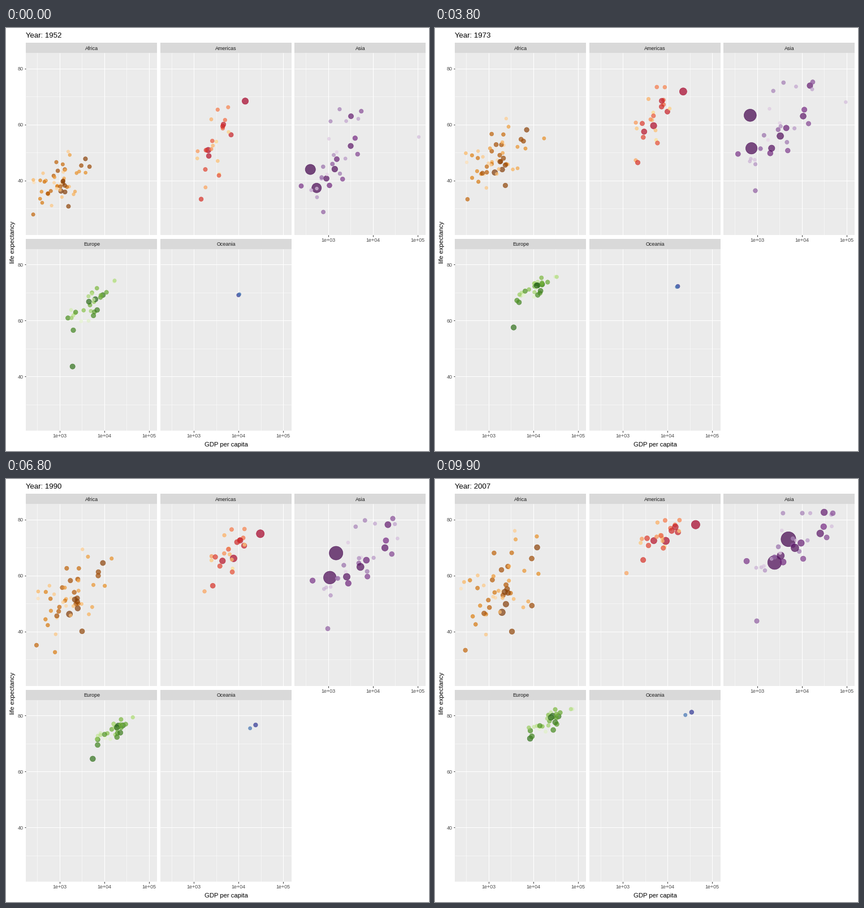
Write a matplotlib script that moves like this. It is 748x748 px and loops after 10 s.

```python
import numpy as np
import matplotlib.pyplot as plt
from matplotlib.animation import FuncAnimation
from matplotlib.colors import to_rgb
from matplotlib.patches import Rectangle

SIZE, DPI, FRAMES = 748, 88, 100
PT = 72 / DPI                      # points per pixel
X_MIN, X_SCALE = 2.2487, 78.91     # log10 income at the left edge, px per decade
Y_MAX, Y_SCALE = 85.553, 4.953     # years of life at the top edge, px per year
WIDTH, HEIGHT, STRIP = 232, 321.5, 18

plt.rcParams["font.family"] = "Liberation Sans"
rng = np.random.default_rng(7)
years = np.linspace(1952, 2007, FRAMES)


class Panel:
    """A facet with its dots; the ramp runs from the most to the least populous."""

    def __init__(self, name, left, top, growth, ramp):
        self.name, self.left, self.top = name, left, top
        self.growth = growth       # population in 1952 relative to 2007
        self.ramp = np.array([to_rgb(c) for c in ramp.split()])
        self.income, self.life, self.people = [], [], []

    def x(self, income):
        return self.left + (income - X_MIN) * X_SCALE

    def y(self, life):
        return self.top + (Y_MAX - life) * Y_SCALE

    def dot(self, people, *stops):
        """One dot led through stops of (year, log10 income, life)."""
        when, income, life = zip(*stops)
        self.people.append(people)
        self.income.append(np.interp(years, when, income))
        self.life.append(np.interp(years, when, life))

    def cloud(self, count, largest, decay, tilt, *stops):
        """A drifting cloud; stops are (year, income, its spread, life, its spread)."""
        when, *shape = zip(*stops)
        income, wide, life, tall = (np.interp(years, when, s) for s in shape)
        u, v = spread(count), spread(count)
        v = tilt * u + np.sqrt(1 - tilt ** 2) * v
        self.people.extend(largest * np.exp(-decay * rng.permutation(count)))
        for a, b in zip(u, v):
            self.income.append(income + wide * a + wobble(0.03))
            self.life.append(np.minimum(life + tall * b + wobble(0.5), 82.3))

    def colors(self):
        rank = np.argsort(np.argsort(-np.array(self.people)))
        at = rank / (len(rank) - 1) * (len(self.ramp) - 1)
        return np.column_stack(
            [np.interp(at, range(len(self.ramp)), channel) for channel in self.ramp.T])

    def diameters(self):
        share = np.interp(years, [1952, 2007], [self.growth, 1])
        crowd = np.outer(share, self.people)
        size = 2 + 10 * np.sqrt(np.clip(crowd - 0.06, 0, None) / 1318.6)
        return 0.75 * (size * 2.845 + 0.945)


def spread(count):
    z = np.clip(rng.normal(size=count), -1.9, 1.9)
    return (z - z.mean()) / z.std()


def wobble(amount):
    """Small offsets that turn at every five-year survey."""
    return np.interp(years, np.arange(1952, 2008, 5), rng.normal(0, amount, 12))


africa = Panel("Africa", 35.5, 44.3, 0.256, "#7F3B08 #B35806 #E08214 #FDB863 #FEE0B6")
americas = Panel("Americas", 273, 44.3, 0.384, "#A50026 #D73027 #F46D43 #FDAE61 #FEE090")
asia = Panel("Asia", 510.5, 44.3, 0.38, "#40004B #762A83 #9970AB #C2A5CF #E7D4E8")
europe = Panel("Europe", 35.5, 390.8, 0.713, "#276419 #4D9221 #7FBC41 #B8E186 #E6F5D0")
oceania = Panel("Oceania", 273, 390.8, 0.435, "#313695 #4575B4")
panels = [africa, americas, asia, europe, oceania]

# the giants and the loners
africa.dot(135, (1952, 3.03, 36.3), (1983, 3.19, 46), (2007, 3.30, 46.9))
africa.dot(44, (1952, 3.67, 45), (1990, 3.87, 61.4), (2007, 3.97, 49.3))
africa.dot(6, (1952, 3.38, 42.7), (1967, 4.27, 50.2), (1983, 4.20, 63), (2007, 4.08, 74))
africa.dot(9, (1952, 2.69, 40), (1987, 2.93, 44), (1992, 2.87, 23.6), (2007, 2.94, 46.2))
americas.dot(301, (1952, 4.15, 68.4), (1973, 4.35, 71.8), (2007, 4.63, 78.2))
americas.dot(190, (1952, 3.32, 50.9), (1983, 3.86, 63.7), (2007, 3.96, 72.4))
americas.dot(8.5, (1952, 3.26, 37.6), (1983, 3.30, 51.8), (2007, 3.08, 60.9))
asia.dot(1319, (1952, 2.60, 44), (1962, 2.69, 44.5), (1967, 2.79, 58.4),
         (1973, 2.84, 63.3), (1990, 3.18, 68.1), (2007, 3.70, 73))
asia.dot(1110, (1952, 2.74, 37.4), (1973, 2.87, 51.5), (1990, 3.04, 59.4), (2007, 3.39, 64.7))
asia.dot(127, (1952, 3.51, 63), (1973, 4.18, 73.9), (2007, 4.50, 82.6))
asia.dot(2.5, (1952, 5.03, 55.6), (1973, 4.99, 68), (1982, 4.50, 71.3), (2007, 4.67, 77.6))
asia.dot(32, (1952, 2.89, 28.8), (1983, 2.99, 40), (2007, 2.99, 43.8))
europe.dot(71, (1952, 3.29, 43.6), (1973, 3.56, 57.5), (2007, 3.93, 71.8))
oceania.dot(20.4, (1952, 4.00, 69.1), (1973, 4.23, 72.2), (2007, 4.54, 81.2))
oceania.dot(4.1, (1952, 4.02, 69.4), (1973, 4.21, 72), (1990, 4.26, 75.5), (2007, 4.40, 80.2))

# everyone else
africa.cloud(48, 80, 0.1, 0.5, (1952, 2.98, 0.29, 39.3, 5),
             (1980, 3.21, 0.35, 50.5, 6.3), (2007, 3.23, 0.41, 55.3, 9))
americas.cloud(22, 109, 0.18, 0.65, (1952, 3.48, 0.21, 53, 8.7),
               (1980, 3.76, 0.22, 65.5, 6.2), (2007, 3.87, 0.27, 74, 3.8))
asia.cloud(28, 224, 0.19, 0.65, (1952, 3.12, 0.34, 47.3, 8.5),
           (1980, 3.58, 0.48, 61.8, 8), (2007, 3.77, 0.50, 71.5, 6))
europe.cloud(29, 82, 0.13, 0.85, (1952, 3.67, 0.27, 65.5, 4.6),
             (1967, 3.93, 0.23, 70.2, 2.4), (1980, 4.14, 0.22, 73, 2.4),
             (2007, 4.34, 0.24, 78, 2.8))

fig = plt.figure(figsize=(SIZE / DPI, SIZE / DPI), dpi=DPI, facecolor="white")
ax = fig.add_axes([0, 0, 1, 1])
ax.set(xlim=(0, SIZE), ylim=(SIZE, 0))
ax.axis("off")


def box(x, y, w, h, color):
    ax.add_patch(Rectangle((x, y), w, h, fc=color, lw=0))


def line(x, y, color="white", width=1.07):
    ax.plot(x, y, color=color, lw=width * PT, solid_capstyle="butt")


def label(x, y, text, size=9, color="black", ha="center", **kw):
    return ax.text(x, y, text, size=size * PT, color=color, ha=ha, va="baseline", **kw)


for p in panels:
    right, bottom = p.left + WIDTH, p.top + HEIGHT
    box(p.left, p.top - STRIP, WIDTH, STRIP, "#D9D9D9")
    box(p.left, p.top, WIDTH, HEIGHT, "#EBEBEB")
    label((p.left + right) / 2, p.top - 5.6, p.name, color="#1A1A1A")
    for width, lives, incomes in ((0.53, (30, 50, 70), (2.5, 3.5, 4.5)),
                                  (1.07, (40, 60, 80), (3, 4, 5))):
        for life in lives:
            line([p.left, right], [p.y(life)] * 2, width=width)
        for income in incomes:
            line([p.x(income)] * 2, [p.top, bottom], width=width)
    if p in (africa, europe):
        for life in (40, 60, 80):
            line([p.left - 2.75, p.left], [p.y(life)] * 2, "#333333")
            label(p.left - 4.9, p.y(life) + 3.2, str(life), color="#4D4D4D", ha="right")
    if p in (asia, europe, oceania):
        for income in (3, 4, 5):
            line([p.x(income)] * 2, [bottom, bottom + 2.75], "#333333")
            label(p.x(income), bottom + 12, f"1e+0{income}", color="#4D4D4D")

label(389, 740, "GDP per capita", 11.3)
label(15, 378.3, "life expectancy", 11.3, rotation=90, rotation_mode="anchor")
title = label(35.5, 16.7, "", 13.2, ha="left")

xs = np.vstack([p.x(np.array(p.income)) for p in panels]).T
ys = np.vstack([p.y(np.array(p.life)) for p in panels]).T
areas = (np.hstack([p.diameters() for p in panels]) * PT) ** 2
rgb = np.vstack([p.colors() for p in panels])
rgba = np.column_stack([rgb, np.full(len(rgb), 0.7)])
dots = ax.scatter(xs[0], ys[0], s=areas[0], c=rgba, edgecolors=rgba,
                  linewidths=0.71 * PT, zorder=5)


def draw(frame):
    dots.set_offsets(np.column_stack([xs[frame], ys[frame]]))
    dots.set_sizes(areas[frame])
    title.set_text(f"Year: {round(years[frame])}")
    return dots, title


anim = FuncAnimation(fig, draw, frames=FRAMES, interval=100, repeat=True, repeat_delay=0)
plt.show()
```
